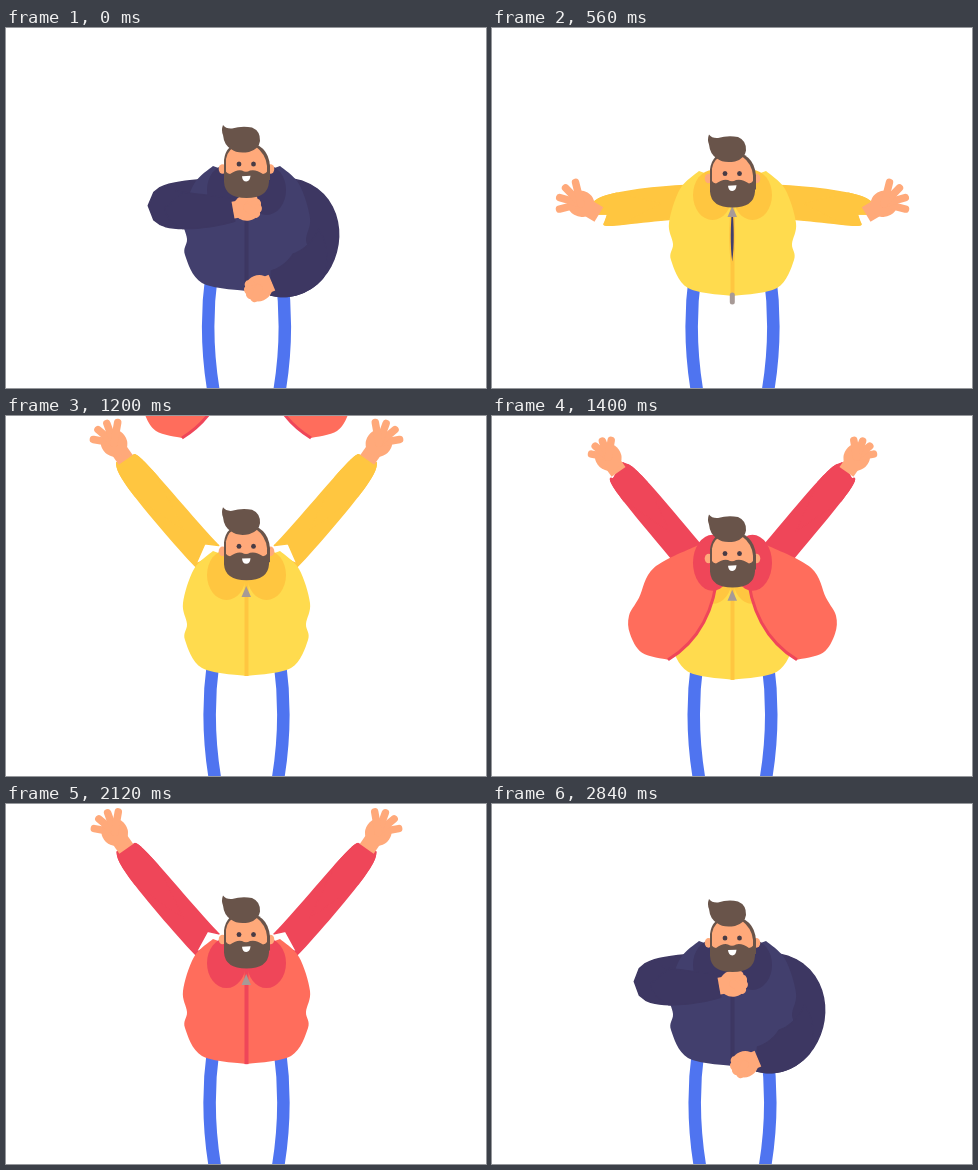
An HTML page that plays this animation: 480x360 px, repeating every 2.88 s.

```html
<!DOCTYPE html>
<html lang="en">
<head>
<meta charset="utf-8">
<title>Jackets</title>
<style>
html, body { margin: 0; width: 100%; height: 100%; overflow: hidden; background: #fff; }
svg { display: block; width: 100vw; height: 100vh; }
</style>
</head>
<body>
<svg id="stage" viewBox="0 0 480 360"></svg>
<script>
const stage = document.getElementById('stage');
const TURN = 960, AXIS = 240.5;
const SKIN = '#ffa97a', HAIR = '#69544a', ZIP = '#a79a96', LEG = '#4f74f0';
const JACKETS = [
  { light: '#423f6d', dark: '#3d3762' },
  { light: '#ffdb4e', dark: '#ffc640' },
  { light: '#ff6d5c', dark: '#ef4659' }
];

const lerp = (a, b, k) => a + (b - a) * k;
const clamp = k => Math.max(0, Math.min(1, k));
const ease = (p, from, to) => { const k = clamp((p - from) / (to - from)); return k * k * (3 - 2 * k); };
const bump = (p, from, to) => Math.sin(Math.PI * clamp((p - from) / (to - from)));
const mirrorX = x => 2 * AXIS - x;

// A pose is seen on the left side: elbow, wrist, sleeve width, hand angle, finger reach.
const pose = (ex, ey, wx, wy, wide, turn, reach) => ({ ex, ey, wx, wy, wide, turn, reach });
const blend = (a, b, k) =>
  Object.fromEntries(Object.keys(a).map(n => [n, lerp(a[n], b[n], k)]));

const CHIN = pose(145, 181, 228, 182, 38, -10, 14);
const UP = pose(166, 102, 126, 55, 31, -125, 20);
const WIDE = pose(155, 176, 106, 186, 33, -149, 25);
const LOW = pose(158, 203, 228, 235, 37, -370, 14);
const HIP = pose(155, 214, 216, 255, 40, 23, 14);

// Rest, throw the arms up, drop them wide, fold them in, and rest again.
function arm(p, rest, fold, end, lift) {
  let a = blend(rest, UP, ease(p, 0, 150));
  const stretch = 12 * bump(p, 60, 440);
  a = blend(a, WIDE, ease(p, 440, 560));
  a = blend(a, fold, ease(p, 590, 740));
  a = blend(a, end, ease(p, 800, 880));
  a.wx -= stretch * 0.57;
  a.wy -= stretch;
  a.reach += stretch / 3;
  a.sx = 204;
  a.sy = 170 + lift - 0.2 * Math.max(0, 170 - a.wy);
  return a;
}

function bounce(p) {
  const up = -3 * bump(p, 60, 400);
  return up + 5 * ease(p, 400, 560) - 7.3 * ease(p, 560, 880) + 2.3 * ease(p, 880, 960);
}

const path = (d, fill, extra = '') => `<path d="${d}" fill="${fill}" ${extra}/>`;
const line = (d, color, w, cap = 'butt') =>
  path(d, 'none', `stroke="${color}" stroke-width="${w}" stroke-linecap="${cap}"`);
const ellipse = (x, y, rx, ry, fill) => `<ellipse cx="${x}" cy="${y}" rx="${rx}" ry="${ry}" fill="${fill}"/>`;
const shift = (y, body) => `<g transform="translate(0 ${y})">${body}</g>`;
const flip = body => `<g transform="matrix(-1 0 0 1 ${2 * AXIS} 0)">${body}</g>`;
const both = body => body + flip(body);

// Smooth curve segments through a list of points.
function smooth(pts) {
  let d = '';
  for (let i = 0; i < pts.length - 1; i++) {
    const a = pts[Math.max(0, i - 1)], b = pts[i], c = pts[i + 1], e = pts[Math.min(pts.length - 1, i + 2)];
    const one = b.map((v, j) => v + (c[j] - a[j]) / 6), two = c.map((v, j) => v - (e[j] - b[j]) / 6);
    d += `C${one} ${two} ${c}`;
  }
  return d;
}

// Tapered sleeve; the front part grows out of the elbow.
function sleeve(a, color, front) {
  const nx = (a.wx - a.sx) / 2, ny = (a.wy - a.sy) / 2;
  const xs = [a.sx, a.ex - nx, a.ex + nx, a.wx], ys = [a.sy, a.ey - ny, a.ey + ny, a.wy];
  const one = [], two = [];
  for (let i = 0; i <= 24; i++) {
    const t = lerp(front ? 0.4 : 0, 1, i / 24), u = 1 - t;
    const at = v => u ** 3 * v[0] + 3 * u * u * t * v[1] + 3 * u * t * t * v[2] + t ** 3 * v[3];
    const slope = v => u * u * (v[1] - v[0]) + 2 * u * t * (v[2] - v[1]) + t * t * (v[3] - v[2]);
    const x = at(xs), y = at(ys), dx = slope(xs), dy = slope(ys);
    const grow = front ? clamp((t - 0.4) / 0.3) : 1;
    const k = grow * a.wide * (1 - 0.4 * t ** 6) / 2 / (Math.hypot(dx, dy) || 1);
    one.push([x - dy * k, y + dx * k]);
    two.unshift([x + dy * k, y - dx * k]);
  }
  return path('M' + one.concat(two).join('L') + 'Z', color,
    `stroke="${color}" stroke-width="1.5" stroke-linejoin="round"`);
}

function hand(a) {
  const palm = 5 + a.reach * 0.6;
  let s = line(`M-1 0H${palm}`, SKIN, 17) + ellipse(palm, 0, 14, 13, SKIN);
  for (let deg = -45; deg <= 45; deg += 30) {
    const r = deg * Math.PI / 180, n = a.reach - 3;
    s += line(`M${palm} 0l${n * Math.cos(r)} ${n * Math.sin(r)}`, SKIN, 7.5, 'round');
  }
  return `<g transform="translate(${a.wx} ${a.wy}) rotate(${a.turn})">${s}</g>`;
}

// Outline of the left front, from hem to shoulder.
const SHUT = [[240, 263], [196, 255], [179, 227], [181, 211], [177, 190], [188, 156], [207, 138]];
const SPREAD = [[176, 243], [150, 236], [138, 217], [137, 199], [147, 181], [162, 151], [207, 128]];

function coat(c, arms, open, y, sleeves) {
  const rim = SHUT.map((q, i) => q.map((v, j) => lerp(v, SPREAD[i][j], open)));
  const edge = `M${lerp(240, 226, open)} 150Q${lerp(240, 222, open)} ${lerp(200, 215, open)} ${rim[0]}`;
  const half = path(edge + smooth(rim) + 'Z', c.light) + line(edge, c.dark, 3) +
    ellipse(220.5, lerp(162, 146, open), 19.5, lerp(25, 28, open), c.dark);
  const limbs = front => sleeves
    ? sleeve(arms[0], c.dark, front) + flip(sleeve(arms[1], c.dark, front)) : '';
  return limbs(false) + shift(y, both(half)) + limbs(true);
}

function legs(y) {
  const mid = 202.7 - 0.5 * y;
  return both(line(`M${mid + 3} 246Q${mid - 5} 305 ${mid + 5} 364`, LEG, 12.5));
}

function head(y, hairY) {
  return shift(y,
    both(ellipse(216.5, 141, 3.8, 4.8, SKIN)) +
    path('M218 152V132Q220 115 238 114Q262 115 264 138V152Z', HAIR) +
    path('M220 152V131Q222 120 232 118H249Q260 126 261 138V152Z', SKIN) +
    path('M218 138Q219 145 224 146Q231 141 236 142.5Q240 145 244 142.5Q250 141 257 146Q262 145 263 138V154Q262 170 240.5 170Q219 170 218 154Z', HAIR) +
    path('M236 148.2L244.5 147.8Q244 153.5 240.3 153.5Q236.5 153.5 236 148.2Z', '#fff') +
    ellipse(233, 136, 2.4, 2.5, '#493c45') + ellipse(247.5, 136, 2.4, 2.5, '#493c45') +
    shift(hairY, path('M217 97Q220 101 226 100.5Q236 97.5 246 99.5Q254.5 103 254 113Q253 121 243 124Q231 126 225 121Q218 117 217 107Q215 102 217 97Z', HAIR)));
}

function zipper(p, under, over, y) {
  let s = '';
  if (p > 545 && p < 870) {
    const end = lerp(233, 184, ease(p, 790, 870));
    s += path(`M239 178Q236.5 ${end - 20} 240.2 ${end}Q244 ${end - 20} 241.5 178Z`,
      under.light, `stroke="${over.dark}" stroke-width="1.5"`);
  }
  s += path('M240.2 173L245 184H235.5Z', ZIP);
  if (p > 530 && p < 800) s += line(`M240.3 ${lerp(262, 228, ease(p, 590, 740))}v7`, ZIP, 5, 'round');
  return shift(y, s);
}

function draw(time) {
  const turn = Math.floor(time / TURN) % 3, p = time % TURN;
  const under = JACKETS[turn], over = JACKETS[(turn + 1) % 3];
  const y = bounce(p);
  const arms = [arm(p, CHIN, LOW, { ...CHIN, turn: CHIN.turn - 360 }, y), arm(p, HIP, HIP, HIP, y)];
  let s = legs(y);

  if (p < 550) s += coat(under, arms, 0, y, p < 390);
  if (p > 140) {
    const fall = clamp((p - 140) / 240);
    s += shift(-265 * (1 - fall * fall), coat(over, arms, 1 - ease(p, 445, 550), y, true));
  }
  s += zipper(p, under, over, y);
  s += hand(arms[0]) + flip(hand(arms[1]));
  s += head(1.9 * y, 4 * bump(p, 680, 920));
  stage.innerHTML = s;
}

const start = performance.now();
function tick() {
  draw((performance.now() - start) % (TURN * 3));
  requestAnimationFrame(tick);
}
tick();
</script>
</body>
</html>
```
